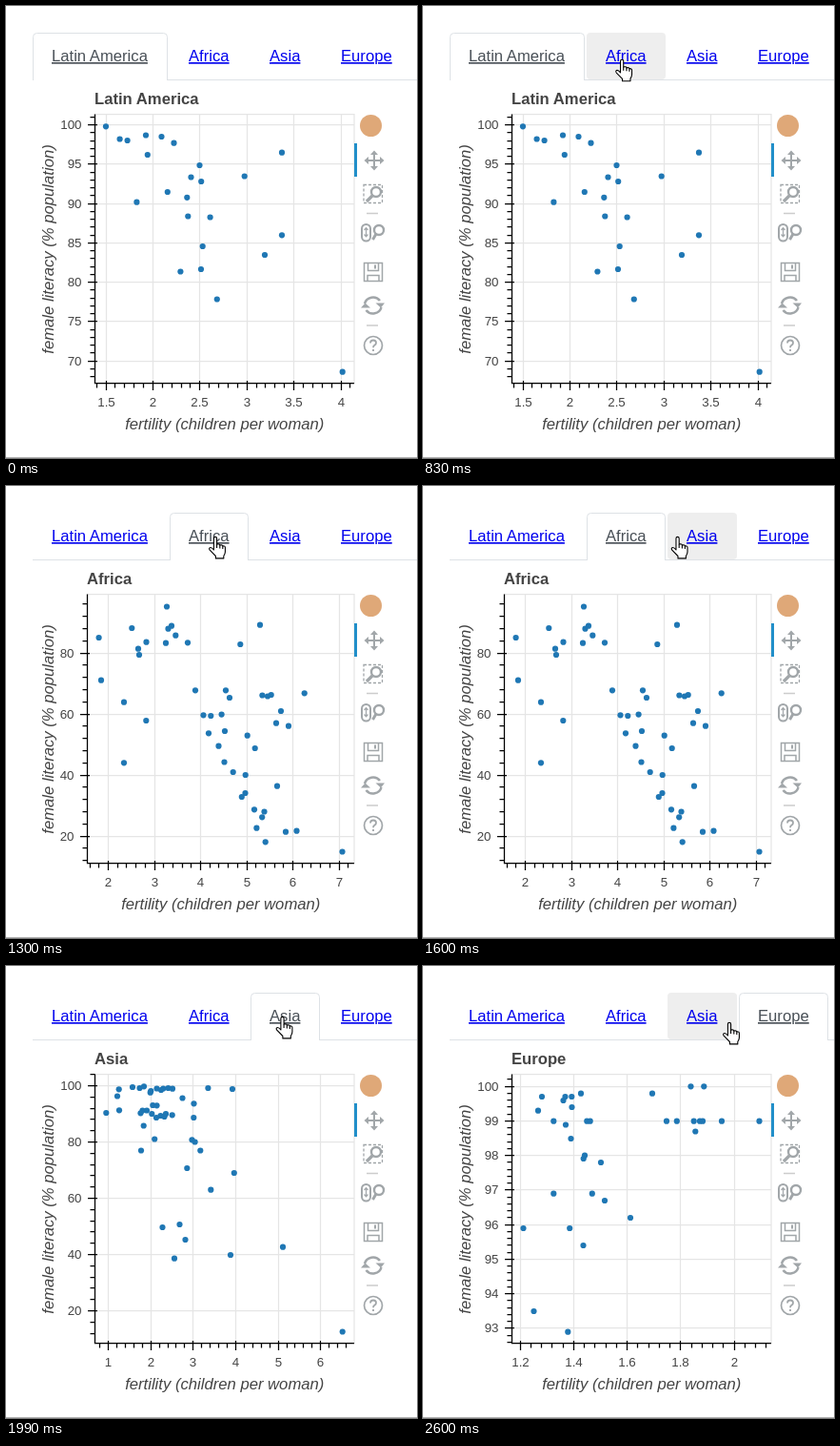
Recreate the animation shown at these times as an HTML page. Size 432 by 474 pixels, loop 2680 ms.

```html
<!DOCTYPE html>
<html lang="en">
<head>
<meta charset="utf-8">
<title>Tabbed scatter plots</title>
<style>
  html, body { margin: 0; width: 100%; height: 100%; overflow: hidden; background: #fff; }
  svg { display: block; width: 432px; height: 474px; }
  text { font-family: "Liberation Sans", Arial, sans-serif; font-size: 16.67px; fill: #444; }
  .tab rect { fill: none; }
  .tab path { fill: #fff; stroke: #dee2e6; display: none; }
  .tab text { fill: #00e; text-decoration: underline; }
  .tab.hover rect { fill: #eee; }
  .tab.active rect { fill: none; }
  .tab.active path { display: inline; }
  .tab.active text { fill: #495057; }
  .tab.pressed text { fill: #f00; }
  .title { font-weight: bold; }
  .label { font-style: italic; text-anchor: middle; }
  .tick { font-size: 13.33px; }
  .grid { stroke: #e5e5e5; stroke-width: 1.25; fill: none; }
  .axis { stroke: #000; stroke-width: 1.25; fill: none; }
  .dot { fill: #1f77b4; }
  .icon { fill: none; stroke: #a1a6a9; stroke-width: 2; }
  .cursor { fill: #fff; stroke: #000; stroke-width: 1.1; stroke-linejoin: round; }
</style>
</head>
<body>
<svg viewBox="0 0 432 474">
  <path d="M28 77.5H432" stroke="#dee2e6"/>
  <g id="tabs"></g>
  <g id="charts"></g>

  <circle cx="383.5" cy="125.5" r="11.5" fill="#dfa878"/>
  <rect x="366" y="144" width="3" height="35" fill="#218fc9"/>
  <g class="icon">
    <path d="M387 154V170M379 162H395"/>
    <path d="M387 151.5l4 4.5h-8zM387 172.5l4-4.5h-8zM376.5 162l4.5-4v8zM397.5 162l-4.5-4v8z" fill="#a1a6a9" stroke="none"/>
    <path d="M376 187.5H395.5V206.5H376Z" stroke-width="1.3" stroke-dasharray="3 2"/>
    <circle cx="389" cy="195" r="5" fill="#fff" stroke-width="2.4"/>
    <path d="M385 199L379 205" stroke-width="3.2"/>
    <path d="M379 217.5H391M379 335H391" stroke="#ccc" stroke-width="1.3"/>
    <rect x="374" y="229" width="9" height="17.5" rx="4.5"/>
    <path d="M378.5 233V241M376.5 235l2-2.3 2 2.3M376.5 239.5l2 2.3 2-2.3" stroke-width="1.2"/>
    <circle cx="392" cy="235" r="5" stroke-width="2.4"/>
    <path d="M389 239L385.5 245" stroke-width="3"/>
    <path d="M376.5 269.5H395.5V288.5H376.5ZM380.5 270V277.5H391.5V270M380 288V282.5H392V288" stroke-width="1.5"/>
    <path d="M388 271.5V275.5" stroke-width="2"/>
    <path d="M377 312A9 8.5 0 0 1 393 309M394.5 316A9 8.5 0 0 1 378.5 319" stroke-width="2.5"/>
    <path d="M388.5 311.5H398L394 316.5ZM373 316.5H383L377.5 311.5Z" fill="#a1a6a9" stroke="none"/>
    <circle cx="386" cy="356" r="9.5" stroke-width="1.7"/>
    <path d="M383 353.5q0-3 3-3t3 2.7q0 1.6-1.7 2.6-1.3.8-1.3 2.5M386 360v2" stroke-width="1.8"/>
  </g>
  <path d="M0 473.5H432" stroke="#b4b4b4"/>

  <circle id="press" r="15" fill="#f8e935" fill-opacity=".62"/>
  <g id="pointer" class="cursor">
    <path id="arrow" d="M.5.5V16.4L4.2 13L6.8 19L9.4 17.9L6.9 12.2H11.8Z"/>
    <g id="hand" transform="translate(-7)">
      <path d="M5.4 14V2a1.6 1.6 0 0 1 3.2 0V8q3-.6 3.2 1 2.8-.6 3 .9 2.6-.4 2.6 1.6v4.5q0 2-1.6 4.5V22.9H7.4V20.5L1.2 14.2Q0 12.6 1.3 11.7 3 11 5.4 14Z"/>
      <path d="M8.6 8v4M11.8 9v3.5M14.8 10v3" fill="none"/>
    </g>
  </g>
</svg>

<script>
const LOOP = 2680;
const TOP = 113.5, BOTTOM = 395.5, RIGHT = 366;
const $ = id => document.getElementById(id);

function add(parent, tag, attrs, text) {
  const el = document.createElementNS("http://www.w3.org/2000/svg", tag);
  for (const k in attrs) el.setAttribute(k, attrs[k]);
  if (text !== undefined) el.textContent = text;
  return parent.appendChild(el);
}

const tabs = [
  { name: "Latin America", x: 28, w: 142 },
  { name: "Africa", x: 172, w: 83 },
  { name: "Asia", x: 257, w: 73 },
  { name: "Europe", x: 332, w: 94 }
];

// Each axis: place of the first label, spacing, labels. Dots are x, y pairs on the stage.
const plots = [
  { left: 93.5,
    x: [105, 49.4, ["1.5", "2", "2.5", "3", "3.5", "4"]],
    y: [124.5, 41.25, [100, 95, 90, 85, 80, 75, 70]],
    dots: [105,126.3, 119.6,139.5, 127.6,141, 147,135.5, 163.5,137, 176.5,143.7,
      148.8,156, 137.4,205.7, 169.8,195, 203.5,167, 194.5,179.5, 205.2,184,
      190.3,200.8, 191.3,220.5, 214.6,221.5, 206.7,252, 205,276, 183.4,278.5,
      221.8,307.5, 250.7,178.5, 290,153.7, 290,240.3, 272,261, 353.7,383.7] },
  { left: 85.5,
    x: [107.5, 48.5, [2, 3, 4, 5, 6, 7]],
    y: [175, 64, [80, 60, 40, 20]],
    dots: [97.6,159, 100,203.7, 124,226.7, 124,290.3, 132.3,149, 139,170.7, 140,177,
      147.5,163.7, 147.3,246, 169,126.5, 168,164.7, 170.5,149.7, 174,146.7,
      178.3,156.7, 191,164.3, 199,214.3, 207.5,240.3, 215.3,241, 213,259.3,
      226.6,239.6, 231,214.3, 235,222, 230,257, 223.5,272.7, 229.5,289.5,
      238.7,300, 246.3,166, 267,145.7, 269.4,219.5, 275,220.5, 278.7,219,
      289,236, 284,248.7, 297,251.7, 253.7,261.7, 261.7,275, 251.7,303,
      251.5,322, 247.8,326, 285,314.7, 261,339.3, 271.5,341.5, 269.2,347.3,
      263.4,358.7, 294,362.7, 305.5,361.7, 272.7,373.3, 353.5,383.5, 313.7,217.3] },
  { left: 93.5,
    x: [107.5, 44.65, [1, 2, 3, 4, 5, 6]],
    y: [125.5, 59, [100, 80, 60, 40, 20]],
    dots: [105.3,154, 118.7,129.3, 117,136.5, 119,151.3, 133,127, 140.5,128, 145,126.3,
      152.3,131, 151.7,132.7, 158.5,128.5, 163,130, 165.3,128.5, 170.5,128,
      175,128.7, 185.5,138.5, 212.4,128, 238,129, 197.5,144.3, 154.3,146,
      158.5,146.3, 143.5,151.5, 148,151.5, 141.5,154.3, 153.3,155, 158,159,
      162.5,157, 166.5,158, 168,155, 174.7,156.3, 197.3,159, 144.7,167.5,
      156.2,181.5, 142,193.5, 195.5,182.3, 198.6,184.5, 204.3,193.5, 190.3,212,
      239.8,217, 215.3,234.7, 164.5,274, 182.5,271, 188.5,287, 177,306.7,
      236,303, 291,294.7, 353.7,383.5] },
  { left: 93.5,
    x: [102, 56.3, ["1.2", "1.4", "1.6", "1.8", "2"]],
    y: [126, 36.25, [100, 99, 98, 97, 96, 95, 94, 93]],
    dots: [125,137, 121,151.7, 105.5,275, 116.5,362, 137.3,162.7, 137.3,238.7,
      149.5,137, 147.5,141, 156.3,137, 156.5,148, 166,133.7, 150,166.5,
      155.5,181, 172.3,162.7, 175.7,162.7, 170,198.7, 168.7,202, 187,206,
      177.8,238.7, 191,246, 154.2,275, 168.5,293, 152.3,383.7, 218,264,
      241,133.7, 256,162.7, 266.8,162.7, 281.5,126.3, 295.3,126.3, 284.7,162.7,
      291,162.7, 294,162.7, 286.3,173.5, 314,162.7, 353.5,162.7] }
];

const snap = v => Math.floor(v) + 0.5;

// Calls visit(place, label) for every tick inside the range; minor ticks have no label.
function eachTick([start, step, labels], lo, hi, visit) {
  const first = Math.ceil((lo - start) / step * 5);
  const last = Math.floor((hi - start) / step * 5);
  for (let i = first; i <= last; i++) {
    visit(snap(start + i * step / 5), i % 5 ? undefined : labels[i / 5]);
  }
}

function buildPlot(plot, name) {
  const g = add($("charts"), "g", {});
  const { left, dots } = plot;
  const texts = [];
  let grid = `M${left} ${TOP}H${RIGHT}V${BOTTOM}H${left}Z`;
  let axis = `M${left} ${TOP}V${BOTTOM}H${RIGHT}`;

  eachTick(plot.x, left, RIGHT, (x, label) => {
    const major = label !== undefined;
    axis += `M${x} ${BOTTOM - (major ? 2.5 : 0)}V${BOTTOM + (major ? 7.5 : 5)}`;
    if (!major) return;
    grid += `M${x} ${TOP}V${BOTTOM}`;
    texts.push([x, 420, "middle", label]);
  });
  eachTick(plot.y, TOP, BOTTOM, (y, label) => {
    const major = label !== undefined;
    axis += `M${left + (major ? 2.5 : 0)} ${y}H${left - (major ? 7.5 : 5)}`;
    if (!major) return;
    grid += `M${left} ${y}H${RIGHT}`;
    texts.push([left - 14, y + 4.5, "end", label]);
  });

  add(g, "path", { class: "grid", d: grid });
  add(g, "path", { class: "axis", d: axis });
  for (let i = 0; i < dots.length; i += 2) {
    add(g, "circle", { class: "dot", cx: dots[i], cy: dots[i + 1], r: 3.1 });
  }
  for (const [x, y, anchor, label] of texts) {
    add(g, "text", { class: "tick", x, y, "text-anchor": anchor }, label);
  }
  add(g, "text", { class: "title", x: left - 0.5, y: 103 }, name);
  add(g, "text", { class: "label", x: (left + RIGHT) / 2, y: 444 }, "fertility (children per woman)");
  add(g, "text", { class: "label", transform: "translate(49.5 255) rotate(-90)" },
    "female literacy (% population)");
  return g;
}

function buildTab({ name, x, w }) {
  const g = add($("tabs"), "g", { class: "tab" });
  add(g, "rect", { x, y: 28, width: w, height: 49, rx: 4 });
  add(g, "path", {
    d: `M${x + 0.5} 78V32.5q0-4 4-4H${x + w - 4.5}q4 0 4 4V78`
  });
  add(g, "text", { x: x + 20, y: 58 }, name);
  return g;
}

const tabEls = tabs.map(buildTab);
const plotEls = plots.map((p, i) => buildPlot(p, tabs[i].name));

// Pointer moves, sampled in n steps with an ease-out power.
const moves = [
  { t0: 70, t1: 360, n: 4, from: [349, 428], to: [136, 90], pow: 1.4 },
  { t0: 510, t1: 900, n: 5, from: [132, 76], to: [220, 53], pow: 1.3 },
  { t0: 1372.5, t1: 1760, n: 5, from: [220, 53], to: [290.5, 53], pow: 2.2 },
  { t0: 1995, t1: 2220, n: 3, from: [290.5, 53], to: [382, 50.5], pow: 1.6 },
  { t0: 2460, t1: 2600, n: 2, from: [382, 50.5], to: [322, 59], pow: 1 }
];
const clicks = [
  { down: 1220, up: 1300, tab: 1 },
  { down: 1910, up: 1990, tab: 2 },
  { down: 2370, up: 2450, tab: 3 }
];

function pointerAt(t) {
  const m = moves.filter(m => t >= m.t0).pop();
  if (!m) return null;
  const k = Math.min(m.n, Math.floor((t - m.t0) / (m.t1 - m.t0) * m.n + 1e-6));
  const e = 1 - (1 - k / m.n) ** m.pow;
  return m.from.map((v, i) => v + (m.to[i] - v) * e);
}

const show = (el, on) => { el.style.display = on ? "inline" : "none"; };

function draw(t) {
  const pos = pointerAt(t);
  const press = clicks.find(c => t >= c.down && t < c.up);
  const done = clicks.filter(c => t >= c.up).pop();
  const active = done ? done.tab : 0;
  const over = pos && pos[1] < 75
    ? tabs.findIndex(({ x, w }) => pos[0] >= x && pos[0] < x + w) : -1;

  tabEls.forEach((el, i) => {
    el.classList.toggle("active", i === active);
    el.classList.toggle("hover", i === over);
    el.classList.toggle("pressed", !!press && press.tab === i);
  });
  plotEls.forEach((el, i) => show(el, i === active));

  show($("pointer"), pos);
  show($("press"), press);
  if (!pos) return;
  $("pointer").setAttribute("transform", `translate(${pos})`);
  $("press").setAttribute("transform", `translate(${pos[0] + 0.5} ${pos[1] + 0.5})`);
  show($("hand"), over >= 0);
  show($("arrow"), over < 0);
}

const begin = performance.now();
function tick() {
  draw((performance.now() - begin) % LOOP);
  requestAnimationFrame(tick);
}
tick();
</script>
</body>
</html>
```
